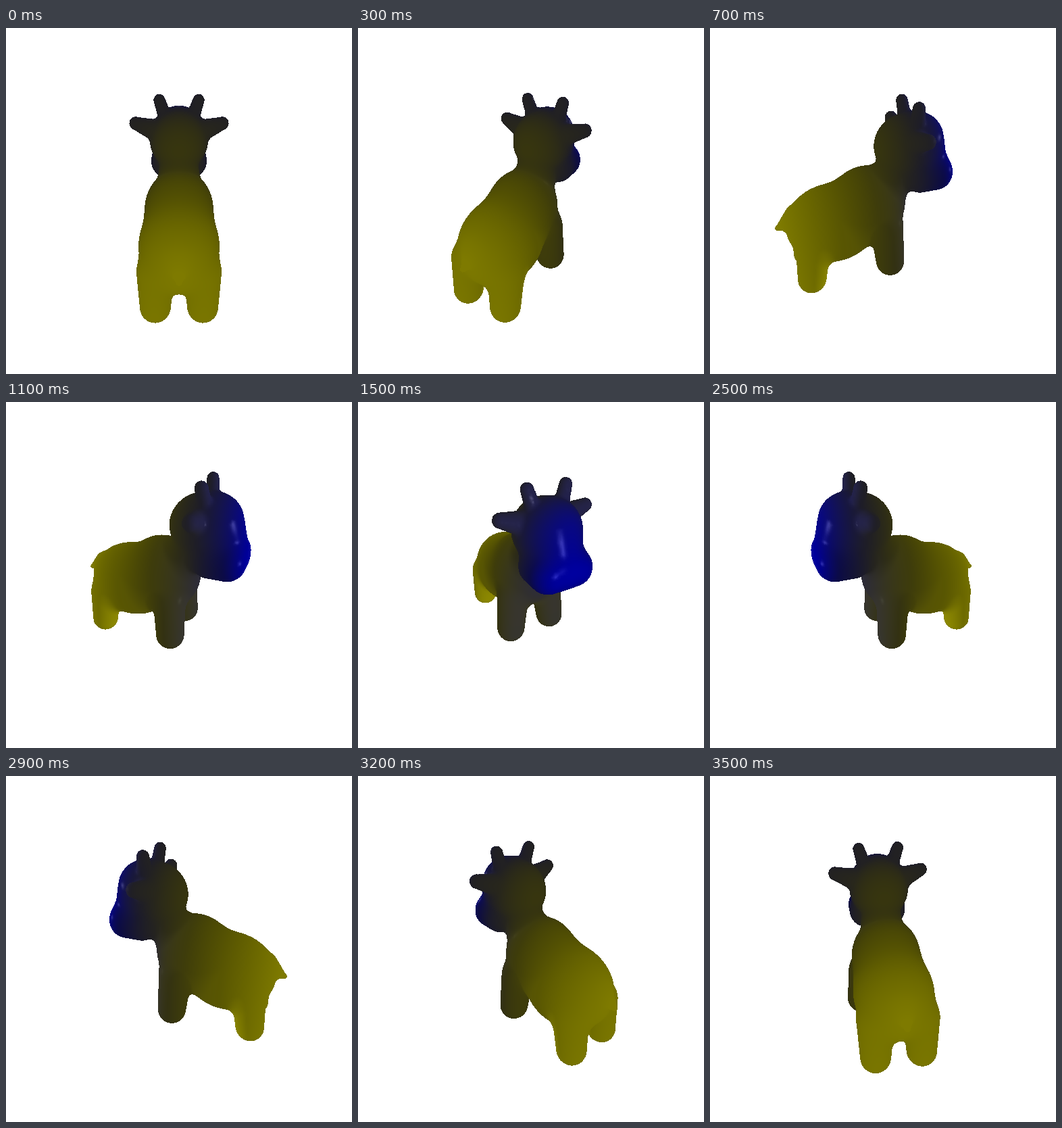
Animation of 512 by 512 pixels, one loop 3.6 s. Source, as an HTML page with a canvas:

```html
<!DOCTYPE html>
<html lang="en">
<head>
<meta charset="utf-8">
<title>Turning cow</title>
<style>
html, body { margin: 0; width: 100%; height: 100%; overflow: hidden; background: #fff; }
canvas { display: block; width: 512px; height: 512px; }
</style>
</head>
<body>
<canvas id="stage" width="512" height="512"></canvas>
<script>
const SIZE = 512, STEPS = 36, STEP_MS = 100;
const DIST = 3, ELEV = Math.PI / 6, FOCAL = SIZE / 2 / Math.tan(Math.PI / 6);
const clamp = (v, lo, hi) => Math.max(lo, Math.min(hi, v));

// Axes: x to the cow's right, y up, z toward its head. Only x >= 0 is modelled.
function ellipsoid(cy, cz, rx, ry, rz) {
  return (x, y, z) => {
    const a = x / rx, b = (y - cy) / ry, c = (z - cz) / rz;
    const k0 = Math.sqrt(a * a + b * b + c * c);
    const e = a / rx, f = b / ry, g = c / rz;
    return k0 * (k0 - 1) / (Math.sqrt(e * e + f * f + g * g) + 1e-9);
  };
}

function limb(x0, y0, z0, r0, x1, y1, z1, r1) {
  const dx = x1 - x0, dy = y1 - y0, dz = z1 - z0, len2 = dx * dx + dy * dy + dz * dz;
  return (x, y, z) => {
    const px = x - x0, py = y - y0, pz = z - z0;
    const h = clamp((px * dx + py * dy + pz * dz) / len2, 0, 1);
    const a = px - h * dx, b = py - h * dy, c = pz - h * dz;
    return Math.sqrt(a * a + b * b + c * c) - r0 - (r1 - r0) * h;
  };
}

function roundBox(cy, cz, hx, hy, hz, r) {
  return (x, y, z) => {
    const a = x - hx, b = Math.abs(y - cy) - hy, c = Math.abs(z - cz) - hz;
    const p = Math.max(a, 0), q = Math.max(b, 0), s = Math.max(c, 0);
    return Math.sqrt(p * p + q * q + s * s) + Math.min(Math.max(a, b, c), 0) - r;
  };
}

// [shape, blend radius]
const parts = [
  [ellipsoid(0, -0.165, 0.325, 0.385, 0.38), 0],
  [ellipsoid(-0.14, -0.51, 0.35, 0.39, 0.45), 0.1],
  [limb(0.195, -0.25, -0.75, 0.155, 0.205, -0.595, -0.8, 0.135), 0.08],
  [limb(0.195, -0.2, -0.03, 0.16, 0.24, -0.58, -0.01, 0.145), 0.08],
  [limb(0, 0, -0.87, 0.09, 0, -0.085, -1.025, 0.025), 0.08],
  [ellipsoid(0.25, 0.09, 0.2, 0.25, 0.19), 0.07],
  [ellipsoid(0.55, 0.245, 0.285, 0.295, 0.32), 0.04],
  [limb(0, 0.6, 0.33, 0.25, 0, 0.36, 0.43, 0.22), 0.05],
  [roundBox(0.29, 0.41, 0.125, 0.005, 0.08, 0.165), 0.07],
  [limb(0.26, 0.665, 0.22, 0.095, 0.41, 0.715, 0.235, 0.062), 0.04],
  [limb(0.13, 0.76, 0.27, 0.066, 0.18, 0.925, 0.25, 0.054), 0.03]
];

function cow(x, y, z) {
  x = Math.abs(x);
  let d = 1e3;
  for (const [shape, k] of parts) {
    const e = shape(x, y, z), h = k - Math.abs(d - e);
    d = Math.min(d, e) - (h > 0 ? h * h / (4 * k) : 0);
  }
  return d;
}

function gradient(x, y, z) {
  const e = 0.008;
  const g = [
    cow(x + e, y, z) - cow(x - e, y, z),
    cow(x, y + e, z) - cow(x, y - e, z),
    cow(x, y, z + e) - cow(x, y, z - e)
  ];
  const len = Math.hypot(...g) || 1;
  return g.map(v => v / len);
}

// Surface nets: one vertex per crossed cell, one quad per crossed edge.
function buildMesh() {
  const s = 0.022, low = [-0.517, -0.81, -1.09];
  const n = [48, 84, 85], stride = [1, n[0], n[0] * n[1]];
  const field = new Float32Array(n[0] * n[1] * n[2]);
  const ids = new Int32Array(field.length).fill(-1);
  const verts = [], normals = [], tris = [];
  for (let k = 0, i = 0; k < n[2]; k++)
    for (let j = 0; j < n[1]; j++)
      for (let h = 0; h < n[0]; h++, i++)
        field[i] = cow(low[0] + h * s, low[1] + j * s, low[2] + k * s);

  const corner = c => (c & 1) + (c >> 1 & 1) * stride[1] + (c >> 2) * stride[2];
  for (let k = 0; k < n[2] - 1; k++)
    for (let j = 0; j < n[1] - 1; j++)
      for (let h = 0; h < n[0] - 1; h++) {
        const i = h + j * stride[1] + k * stride[2], sum = [0, 0, 0];
        let count = 0;
        for (let c = 0; c < 8; c++)
          for (let a = 0; a < 3; a++) {
            if (c >> a & 1) continue;
            const f0 = field[i + corner(c)], f1 = field[i + corner(c | 1 << a)];
            if (f0 < 0 === f1 < 0) continue;
            for (let b = 0; b < 3; b++) sum[b] += b === a ? f0 / (f0 - f1) : c >> b & 1;
            count++;
          }
        if (!count) continue;
        const p = [h, j, k].map((v, a) => low[a] + (v + sum[a] / count) * s);
        const g = gradient(...p), d = clamp(cow(...p), -s / 2, s / 2);
        ids[i] = verts.length;
        verts.push(p.map((v, a) => v - g[a] * d));
        normals.push(g);
      }

  for (let k = 1; k < n[2] - 1; k++)
    for (let j = 1; j < n[1] - 1; j++)
      for (let h = 1; h < n[0] - 1; h++) {
        const i = h + j * stride[1] + k * stride[2];
        for (let a = 0; a < 3; a++) {
          if (field[i] < 0 === field[i + stride[a]] < 0) continue;
          const u = stride[(a + 1) % 3], v = stride[(a + 2) % 3];
          const q = [ids[i], ids[i - u], ids[i - u - v], ids[i - v]];
          tris.push([q[0], q[1], q[2]], [q[0], q[2], q[3]]);
        }
      }
  return { verts, normals, tris };
}

const mesh = buildMesh();
const ctx = document.getElementById("stage").getContext("2d");
const image = ctx.createImageData(SIZE, SIZE);
const zbuf = new Float32Array(SIZE * SIZE);

// Yellow fades out toward the head, blue fades in, and the lamp stands in front.
function shade(p, nrm, eye) {
  const z = p[2];
  const warm = clamp((0.64 - z) / 1.64, 0, 1);
  const cold = Math.pow(clamp((z + 1) / 1.68, 0, 1), 3.2);
  const lit = Math.max(0, nrm[1] * 0.25 + nrm[2] * 0.95);
  let v = eye.map((e, a) => e - p[a]);
  const len = Math.hypot(...v);
  v = v.map(e => e / len);
  v[2] += 1;
  const half = Math.hypot(...v) || 1;
  const spec = nrm[2] > 0
    ? 50 * Math.pow(Math.max(0, (nrm[0] * v[0] + nrm[1] * v[1] + nrm[2] * v[2]) / half), 240) : 0;
  const y = 126 * warm * (1 + 0.4 * Math.max(0, nrm[2]));
  return [y + spec, y * 0.97 + spec, 127 * cold * (0.8 + 0.5 * lit) + spec];
}

function fillTriangle(a, b, c) {
  const area = (b.x - a.x) * (c.y - a.y) - (b.y - a.y) * (c.x - a.x);
  if (!area) return;
  const x0 = Math.ceil(Math.min(a.x, b.x, c.x) - 0.5), x1 = Math.floor(Math.max(a.x, b.x, c.x) - 0.5);
  const y0 = Math.ceil(Math.min(a.y, b.y, c.y) - 0.5), y1 = Math.floor(Math.max(a.y, b.y, c.y) - 0.5);
  for (let y = y0; y <= y1; y++)
    for (let x = x0; x <= x1; x++) {
      const px = x + 0.5, py = y + 0.5;
      const wb = ((px - a.x) * (c.y - a.y) - (py - a.y) * (c.x - a.x)) / area;
      const wc = ((b.x - a.x) * (py - a.y) - (b.y - a.y) * (px - a.x)) / area;
      const wa = 1 - wb - wc;
      if (wa < -1e-6 || wb < -1e-6 || wc < -1e-6) continue;
      const near = wa * a.near + wb * b.near + wc * c.near, i = y * SIZE + x;
      if (near <= zbuf[i]) continue;
      zbuf[i] = near;
      for (let k = 0; k < 3; k++)
        image.data[i * 4 + k] = wa * a.rgb[k] + wb * b.rgb[k] + wc * c.rgb[k];
    }
}

function render(angle) {
  const ca = Math.cos(angle), sa = Math.sin(angle), ce = Math.cos(ELEV), se = Math.sin(ELEV);
  const eye = [DIST * ce * sa, DIST * se, -DIST * ce * ca];
  image.data.fill(255);
  zbuf.fill(0);
  const pts = mesh.verts.map((p, i) => {
    const side = p[0] * ca + p[2] * sa, away = p[2] * ca - p[0] * sa;
    const near = 1 / (DIST + away * ce - p[1] * se);
    return {
      x: SIZE / 2 + FOCAL * side * near,
      y: SIZE / 2 - FOCAL * (p[1] * ce + away * se) * near,
      near,
      rgb: shade(p, mesh.normals[i], eye)
    };
  });
  for (const [a, b, c] of mesh.tris) fillTriangle(pts[a], pts[b], pts[c]);
  ctx.putImageData(image, 0, 0);
}

let shown = -1;
function tick() {
  const step = Math.floor(performance.now() / STEP_MS) % STEPS;
  if (step !== shown) {
    shown = step;
    render(step * 2 * Math.PI / STEPS);
  }
  requestAnimationFrame(tick);
}
tick();
</script>
</body>
</html>
```
